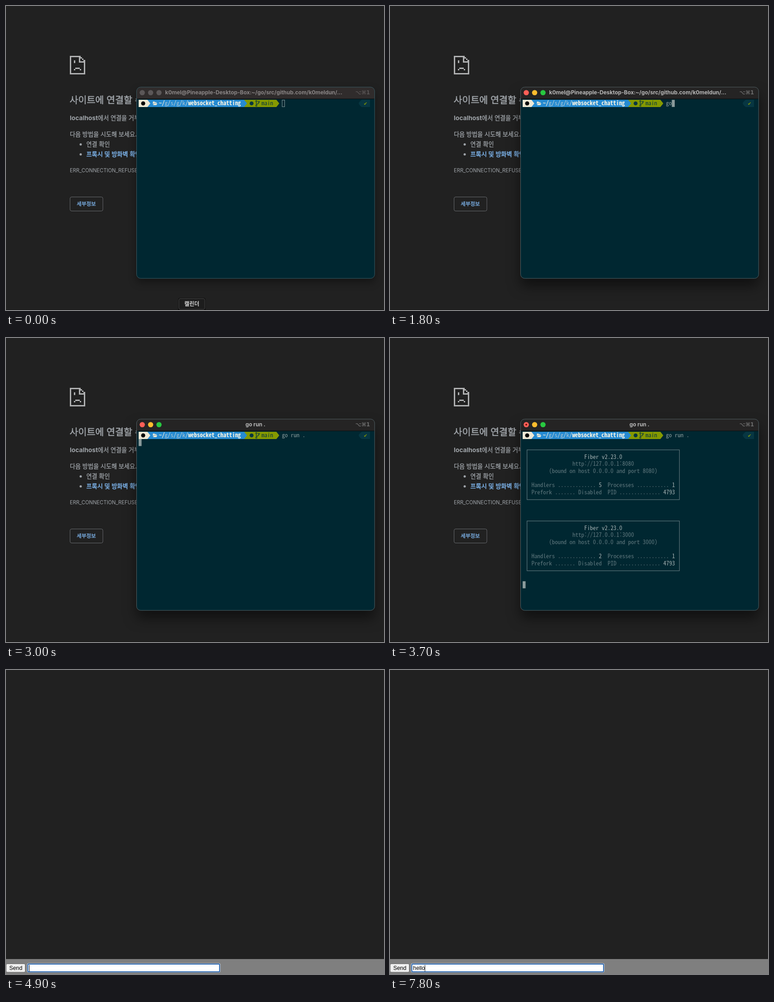
An HTML page that plays this animation: 835x671 px, repeating every 8 s.

```html
<!DOCTYPE html>
<html lang="ko">
<head>
<meta charset="utf-8">
<style>
  html, body { margin: 0; width: 100%; height: 100%; overflow: hidden; background: #212121; }
  svg { display: block; position: absolute; left: 0; top: 0; }
  text { white-space: pre; font-family: "Noto Sans CJK KR", "Noto Sans CJK", sans-serif; }
  /* A hairline outline gives the Hangul a medium weight. */
  .ko { fill: currentColor; stroke: currentColor; stroke-width: .3px; }
  .ui { font-family: Inter, sans-serif; stroke: none; }
  .bold { font-weight: 700; }
  .arial { font: 12.4px "Liberation Sans", sans-serif; }
  .symbol { font-family: "DejaVu Sans", sans-serif; }
  #term text { font-family: "Noto Sans Mono CJK KR", "Noto Sans Mono", monospace; }
</style>
</head>
<body>
<svg width="835" height="671" viewBox="0 0 835 671">
  <rect width="835" height="671" fill="#212121"/>
  <rect y="670" width="835" height="1" fill="#171717"/>

  <g id="page" color="#9fa4a9" fill="#9fa4a9" font-size="13.15">
    <g fill="#b0b1b2">
      <path fill-rule="evenodd" d="M141 110h24v3h3v3h3v3h4v32h-34zM144 113v35h28v-23h-11v-12zM164 116v6h7v-3h-3v-3z"/>
      <path d="M150 120h3v6h-3zM153 136h10v3h-10zM150 139h3v3h-3zM163 139h3v3h-3z"/>
    </g>
    <text x="140.500" y="214.800" font-size="20.600" class="ko" style="stroke-width:.55px">사이트에 연결할 수 없음</text>
    <text x="141" y="252" class="ko"><tspan class="ui bold" font-size="13.8">localhost</tspan>에서 연결을 거부했습니다.</text>
    <text x="141" y="288" class="ko">다음 방법을 시도해 보세요.</text>
    <circle cx="165" cy="305.5" r="2.5"/>
    <text x="177.500" y="310" class="ko">연결 확인</text>
    <circle cx="165" cy="327.5" r="2.5"/>
    <text x="177.500" y="332" color="#80b9f2" class="ko" style="stroke-width:.5px">프록시 및 방화벽 확인</text>
    <text x="141" y="367" class="ui" font-size="11.2">ERR_CONNECTION_REFUSED</text>
    <g font-size="11.5" text-anchor="middle">
      <rect x="141.5" y="421.5" width="72.5" height="31" rx="3.5" fill="none" stroke="#686b6e"/>
      <text x="177.5" y="441" color="#80b9f2" class="ko">세부정보</text>
      <rect x="623.5" y="421.500" width="72" height="29.500" rx="3.5" fill="#8ab4f8"/>
      <text x="659.5" y="440" color="#202124" class="ko">새로고침</text>
    </g>
  </g>

  <g id="win">
    <rect id="frame" x="288.5" y="179" width="526" height="422.5" rx="9" fill="#002731"/>
    <path id="bar" d="M288.5 205v-17a9 9 0 0 1 9-9h508a9 9 0 0 1 9 9v17z"/>
    <path d="M289 205h525" stroke="#0c0c0c"/>
    <rect id="edge" x="288.5" y="179" width="525.8" height="422.2" rx="9" fill="none"/>
    <g id="lights">
      <circle cx="301" cy="191.3" r="5.8"/>
      <circle cx="319.5" cy="191.3" r="5.8"/>
      <circle cx="338" cy="191.3" r="5.8"/>
    </g>
    <circle id="dot" cx="301" cy="191.3" r="2" fill="#6b0f0b"/>
    <text id="title" class="ui bold" y="195.3" font-size="11.9"></text>
    <text id="hint" class="symbol bold" x="804" y="194.5" text-anchor="end" font-size="11.5">⌥⌘1</text>

    <g id="term">
      <path d="M526 207h71.3l6.4 8-6.4 8H526z" fill="#859900"/>
      <path d="M312 207h214l6.5 8-6.5 8H312z" fill="#268bd2"/>
      <path d="M293 207h19.4l6.4 8-6.4 8H293z" fill="#eee8d5"/>
      <path d="M804 207v16h-18q-5-3-7-8 2-5 7-8z" fill="#073642"/>
      <circle cx="303" cy="215" r="4.5" fill="#000"/>
      <path d="M324.5 211h3.5l1 1.3h3.5v1.7h-5.5l-2.5 3.5zM327.3 214.8h7l-2 4h-7.5z" fill="#eee8d5"/>
      <circle cx="542.5" cy="215" r="4.3" fill="#073642"/>
      <g fill="none" stroke="#073642" stroke-width="1.2">
        <circle cx="553" cy="210" r="1.5"/><circle cx="553" cy="220" r="1.5"/><circle cx="558.5" cy="211.5" r="1.5"/>
        <path d="M553 211.5v7M558.5 213q0 3-5.5 4"/>
      </g>
      <text x="790" y="218.5" font-size="10" fill="#859900" style="font-family:'DejaVu Sans',sans-serif">✔</text>
      <g id="output"></g>
      <rect id="cursor"/>
    </g>
  </g>

  <g id="tip">
    <rect x="380.5" y="644.5" width="60" height="28" rx="4" fill="#050505"/>
    <rect x="381.8" y="645.8" width="57.4" height="24" rx="3" fill="#1d1d1d" stroke="#4c4c4c"/>
    <text x="410.5" y="662" text-anchor="middle" font-size="12" color="#eee" class="ko">캘린더</text>
  </g>

  <g id="chat">
    <rect width="835" height="671" fill="#212121"/>
    <rect y="638" width="835" height="33" fill="#7f7f7f"/>
    <rect x="0.5" y="648.5" width="42" height="18.5" rx="2.5" fill="#efefef" stroke="#6b6b6b"/>
    <text x="7.2" y="662" class="arial">Send</text>
    <rect x="46.5" y="647.5" width="427" height="20" rx="3" fill="#fff"/>
    <rect x="48.3" y="649" width="423.5" height="17.3" rx="1.5" fill="#fff" stroke="#1a5aa8" stroke-width="2"/>
    <text id="msg" x="51" y="662" class="arial"></text>
    <rect id="caret" y="651" width="1" height="14.5"/>
  </g>
</svg>

<script>
const $ = id => document.getElementById(id);
const CELL = 6.473, ROW = 15.7, LEFT = 293, LOOP = 8000;
const DIM = '#5f777d', TEXT = '#a3b0b1', CURSOR = '#8b9b9c';
const colX = c => LEFT + c * CELL;
const rowY = r => 215 + r * ROW;
const show = (id, on) => $(id).setAttribute('visibility', on ? 'visible' : 'hidden');
const set = (id, attrs) => { for (const k in attrs) $(id).setAttribute(k, attrs[k]); };

function add(parent, tag, attrs, content = '') {
  const el = document.createElementNS('http://www.w3.org/2000/svg', tag);
  for (const k in attrs) el.setAttribute(k, attrs[k]);
  el.textContent = content;
  return parent.appendChild(el);
}

// Size the terminal font so that one glyph fills one cell.
const pen = document.createElement('canvas').getContext('2d');
pen.font = '100px "Noto Sans Mono CJK KR", "Noto Sans Mono", monospace';
$('term').setAttribute('font-size', CELL * 100 / pen.measureText('0').width);

function put(parent, col, row, str, fill, weight = 400) {
  return add(parent, 'text', { x: colX(col), y: rowY(row) + 4.4, fill, 'font-weight': weight }, str);
}

// Prompt line
const term = $('term');
put(term, 6.9, 0, '~/', '#eee8d5', 700);
[...'gsgk'].forEach((ch, i) => {
  put(term, 8.9 + 2 * i, 0, ch, '#a9c3d2');
  put(term, 9.9 + 2 * i, 0, '/', '#eee8d5');
});
put(term, 16.9, 0, 'websocket_chatting', '#fdf6e3', 700);
put(term, 41.9, 0, 'main', '#073642');
const command = put(term, 48.9, 0, '', CURSOR);

function banner(row, port, handlers) {
  const out = $('output');
  add(out, 'rect', { x: colX(1.5), y: rowY(row) + .5, width: 52 * CELL, height: 7 * ROW, fill: 'none', stroke: '#72858a' });
  const center = (r, str, fill) => put(out, 2 + (51 - str.length) / 2, row + r, str, fill);
  const field = (col, r, label, value, width, fill = TEXT) => {
    const dots = '.'.repeat(width - label.length - value.length - 2);
    put(out, col, row + r, label + ' ' + dots, DIM);
    put(out, col + width - value.length, row + r, value, fill);
  };
  center(1, 'Fiber v2.23.0', TEXT);
  center(2, 'http://127.0.0.1:' + port, DIM);
  center(3, `(bound on host 0.0.0.0 and port ${port})`, DIM);
  field(3, 5, 'Handlers', handlers, 24);
  field(29, 5, 'Processes', '1', 23);
  field(3, 6, 'Prefork', 'Disabled', 24, DIM);
  field(29, 6, 'PID', '4793', 23);
}
banner(2, 8080, '5');
banner(12, 3000, '2');

const typed = (str, times, t) => str.slice(0, times.filter(at => t >= at).length);
const COMMAND_KEYS = [800, 1800, 1900, 2000, 2100, 2300, 2400, 2600];
const HELLO_KEYS = [6800, 7300, 7400, 7600, 7800];

function drawWindow(t) {
  const active = t >= 100, named = t >= 3000;
  const colors = active ? ['#ff5f57', '#febc2e', '#28c840'] : Array(3).fill('#5b5758');
  [...$('lights').children].forEach((c, i) => c.setAttribute('fill', colors[i]));
  set('bar', { fill: active ? '#252424' : '#302c2c' });
  set('edge', { stroke: active ? '#525f63' : '#3a5a62' });
  set('hint', { fill: active ? '#6e6e6e' : '#5a5656' });
  $('frame').style.filter = active
    ? 'drop-shadow(0 17px 14px rgba(0,0,0,.5))'
    : 'drop-shadow(0 8px 9px rgba(0,0,0,.4))';

  set('title', { x: named ? 551 : 351.5, 'text-anchor': named ? 'middle' : 'start', fill: active ? '#b8b8b8' : '#8a8686' });
  $('title').textContent = named ? 'go run .' : 'k0mel@Pineapple-Desktop-Box:~/go/src/github.com/k0meldun/...';

  command.textContent = typed('go run .', COMMAND_KEYS, t);
  const running = t >= 3600;
  const col = t < 2900 ? 48.9 + command.textContent.length : 0;
  const row = running ? 21 : t < 2900 ? 0 : 1;
  const inset = active ? 0 : .5;
  set('cursor', {
    x: colX(col) + inset, y: rowY(row) - 7.8 + inset,
    width: 6.5 - 2 * inset, height: 15.6 - 2 * inset,
    fill: active ? CURSOR : 'none', stroke: active ? 'none' : CURSOR
  });
  show('output', running);
  show('dot', t >= 3700);
}

function drawChat(t) {
  $('msg').textContent = typed('hello', HELLO_KEYS, t);
  const width = $('msg').textContent ? $('msg').getComputedTextLength() : 0;
  const lit = t >= 6800 || Math.floor((t - 4900) / 500) % 2 === 0;
  set('caret', { x: 51 + width - (width ? .5 : 0), opacity: lit ? 1 : 0 });
}

function draw(t) {
  const chat = t >= 4900, open = t < 4400;
  $('win').style.display = open ? '' : 'none';
  $('chat').style.display = chat ? '' : 'none';
  $('tip').style.opacity = t < 300 ? 1 : t < 400 ? .6 : t < 500 ? .25 : 0;
  if (open) drawWindow(t);
  if (chat) drawChat(t);
}

let start;
function tick(now) {
  start ??= now;
  draw((now - start) % LOOP);
  requestAnimationFrame(tick);
}
draw(0);
requestAnimationFrame(tick);
</script>
</body>
</html>
```
